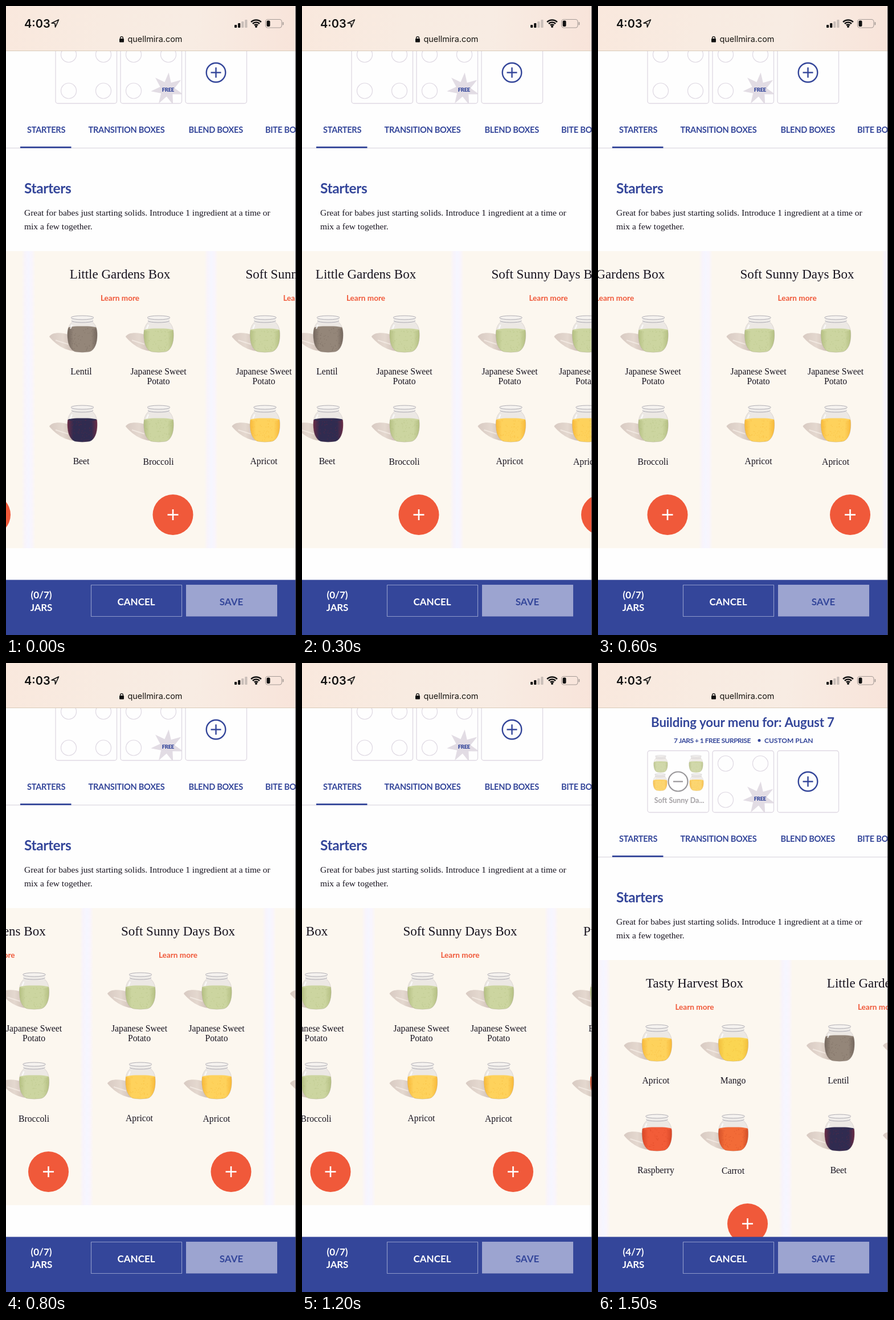
An HTML page with a canvas that plays this animation: 509x1101 px, repeating every 2700 ms.

```html
<!DOCTYPE html>
<html lang="en">
<head>
<meta charset="utf-8">
<title>Jar menu</title>
<style>
  html, body { margin: 0; width: 100%; height: 100%; overflow: hidden; background: #fff; }
  canvas { display: block; width: 100vw; height: 100vh; }
</style>
</head>
<body>
<canvas id="stage" width="509" height="1101"></canvas>
<script>
const W = 509, H = 1101, LOOP = 2700, STEP = 100;
const ctx = document.getElementById('stage').getContext('2d');
const BLUE = '#34469a', ORANGE = '#f0593a', INK = '#17131f', CREAM = '#fcf7ef', LINE = '#ded8e2';
const SANS = 'Lato, sans-serif', SERIF = '"Liberation Serif", serif', UI = 'Inter, sans-serif';

const FOODS = {
  Lentil: ['#948679', '#75685e'],
  'Japanese Sweet Potato': ['#ccd5a0', '#b5c083'],
  Broccoli: ['#ccd5a0', '#b5c083'],
  Beet: ['#302b50', '#6b2c45'],
  Apricot: ['#fed25c', '#f8b93a'],
  Mango: ['#fbd552', '#f2bf3c'],
  Raspberry: ['#f25c38', '#d94727'],
  Carrot: ['#f26b37', '#d34f28']
};
const SWEET = 'Japanese Sweet Potato';
const CARDS = [
  ['Tasty Harvest Box', 'Apricot', 'Mango', 'Raspberry', 'Carrot'],
  ['Little Gardens Box', 'Lentil', SWEET, 'Beet', 'Broccoli'],
  ['Soft Sunny Days Box', SWEET, SWEET, 'Apricot', 'Apricot'],
  ['Purple Meadow Treats', 'Broccoli', SWEET, 'Carrot', 'Mango']
];
const PITCH = 320.5, FIRST = 169.5, CARD_TOP = 520, CARD_H = 520;

// time, scroll, speed per step
const SCROLL = [
  [0, 290, 30], [300, 378, 28], [500, 432, 26.2],
  [800, 508.5, 11.3], [1000, 523, 6], [1200, 533, 4]
];

function scrollAt(t) {
  if (t >= 1500) return 0;
  if (t >= 1200) return 533;
  const i = SCROLL.findIndex(k => k[0] > t) - 1;
  const [t0, a, va] = SCROLL[i], [t1, b, vb] = SCROLL[i + 1];
  const n = (t1 - t0) / STEP, u = (t - t0) / (t1 - t0), v = 1 - u;
  return (1 + 2 * u) * v * v * a + u * v * v * n * va + u * u * (3 - 2 * u) * b - u * u * v * n * vb;
}

function random(seed) {
  return () => (seed = (seed * 16807) % 2147483647) / 2147483647;
}

function text(str, x, y, font, color, align = 'left', spacing = 0) {
  ctx.font = font;
  ctx.fillStyle = color;
  ctx.textAlign = align;
  ctx.letterSpacing = spacing + 'px';
  ctx.fillText(str, x, y);
}

function rect(x, y, w, h, color) {
  ctx.fillStyle = color;
  ctx.fillRect(x, y, w, h);
}

function stroke(color, width) {
  ctx.strokeStyle = color;
  ctx.lineWidth = width;
  ctx.stroke();
}

function fill(color) {
  ctx.fillStyle = color;
  ctx.fill();
}

function circle(x, y, r) {
  ctx.beginPath();
  ctx.arc(x, y, r, 0, Math.PI * 2);
}

function round(x, y, w, h, r) {
  ctx.beginPath();
  ctx.roundRect(x, y, w, h, r);
}

function ellipse(x, y, rx, ry) {
  ctx.beginPath();
  ctx.ellipse(x, y, rx, ry, 0, 0, Math.PI * 2);
}

function line(x1, y1, x2, y2, color, width) {
  ctx.beginPath();
  ctx.moveTo(x1, y1);
  ctx.lineTo(x2, y2);
  stroke(color, width);
}

function plus(x, y, arm, color, width) {
  line(x - arm, y, x + arm, y, color, width);
  line(x, y - arm, x, y + arm, color, width);
}

function jarBody() {
  ctx.beginPath();
  ctx.moveTo(-19, 13);
  ctx.bezierCurveTo(-25, 19, -27, 28, -26, 40);
  ctx.bezierCurveTo(-25, 54, -19, 64, -10, 64.5);
  ctx.quadraticCurveTo(0, 66, 10, 64.5);
  ctx.bezierCurveTo(19, 64, 25, 54, 26, 40);
  ctx.bezierCurveTo(27, 28, 25, 19, 19, 13);
  ctx.closePath();
}

function shadow() {
  ctx.beginPath();
  ctx.moveTo(-14, 63);
  ctx.bezierCurveTo(-32, 62, -48, 50, -58, 38);
  ctx.bezierCurveTo(-54, 29, -34, 30, -22, 35);
  ctx.lineTo(-10, 60);
  ctx.closePath();
  const g = ctx.createLinearGradient(-58, 0, -15, 0);
  g.addColorStop(0, '#d8cac2');
  g.addColorStop(0.55, '#e4d8cf');
  g.addColorStop(1, '#cfbfb5');
  fill(g);
  line(-47, 44, -25, 51, 'rgba(255,250,244,.5)', 2);
}

function jar(x, y, food, scale = 1, cast = true) {
  const [base, dark] = FOODS[food];
  const level = food === 'Lentil' ? 22 : 26;
  ctx.save();
  ctx.translate(x, y);
  ctx.scale(scale, scale);
  if (cast) shadow();

  jarBody();
  fill('#ece8e4');
  ctx.save();
  ctx.clip();
  const g = ctx.createLinearGradient(-26, 0, 26, 0);
  g.addColorStop(0, dark);
  g.addColorStop(0.2, base);
  g.addColorStop(0.8, base);
  g.addColorStop(1, dark);
  rect(-28, level, 56, 45, g);
  ellipse(0, level, 25, 2.6);
  fill(base);
  ctx.globalAlpha = 0.4;
  const rnd = random(food.length * 977 + 13);
  for (let i = 0; i < 70; i++) {
    rect(-26 + rnd() * 52, level + rnd() * 40, 1.4, 1.4, dark);
  }
  ctx.globalAlpha = 1;
  ctx.restore();
  jarBody();
  stroke('rgba(150,140,140,.3)', 0.8);

  round(-19, 4, 38, 10, 3);
  fill('#eeebe8');
  ellipse(0, 4.5, 20, 3.4);
  fill('#f5f2ef');
  stroke('#a9a6ad', 0.9);
  ctx.beginPath();
  ctx.ellipse(0, 10, 19, 3, 0, 0.1, Math.PI - 0.1);
  stroke('#aaa7af', 1);
  line(-18, 17, -21, 24, 'rgba(255,255,255,.8)', 2);
  ctx.restore();
}

function label(food, x, y) {
  const font = '15.7px ' + SERIF;
  const cut = food.lastIndexOf(' ');
  if (cut < 0) return text(food, x, y, font, INK, 'center');
  text(food.slice(0, cut), x, y, font, INK, 'center');
  text(food.slice(cut + 1), x, y + 17, font, INK, 'center');
}

function card([title, ...foods], c) {
  if (c < -180 || c > W + 180) return;
  rect(c - 150, CARD_TOP, 300.5, CARD_H, CREAM);
  text(title, c, 568, '23px ' + SERIF, INK, 'center');
  text('Learn more', c, 607, '700 13.6px ' + SANS, ORANGE, 'center');
  foods.forEach((food, i) => {
    const right = i % 2, row = i >> 1;
    jar(c + (right ? 68 : -66), 632 + row * 157, food);
    label(food, c + (right ? 67.5 : -68), 736 + row * 157 + right * row);
  });
  circle(c + 93, 981.5, 35.5);
  fill(ORANGE);
  plus(c + 93, 981.5, 9.5, '#fff', 2.6);
}

function gap(x) {
  const g = ctx.createLinearGradient(x - 2, 0, x + 22, 0);
  g.addColorStop(0, CREAM);
  g.addColorStop(0.25, '#f8f4fb');
  g.addColorStop(0.5, '#f6f6ff');
  g.addColorStop(0.75, '#f9f5fc');
  g.addColorStop(1, CREAM);
  rect(x - 2, CARD_TOP, 24, CARD_H, g);
}

function star(x, y) {
  ctx.beginPath();
  for (let i = 0; i < 14; i++) {
    const a = -1.48 + i * Math.PI / 7, r = i % 2 ? 13 : 29;
    ctx.lineTo(x + r * Math.cos(a), y + r * Math.sin(a));
  }
  ctx.closePath();
  fill('#e2dce4');
}

function emptySlots(x) {
  for (const dx of [23, 84]) {
    for (const y of [176, 239.5]) {
      circle(x + dx, y, 13.5);
      stroke(LINE, 1.2);
    }
  }
}

function chosenBox() {
  ctx.save();
  ctx.globalAlpha = 0.85;
  [[110, 161, SWEET], [172, 161, SWEET], [109, 193, 'Apricot'], [173, 193, 'Apricot']]
    .forEach(([x, y, food]) => jar(x, y, food, 0.47, false));
  ctx.restore();
  circle(140.5, 207.5, 17);
  fill('rgba(255,255,255,.85)');
  stroke('#99979a', 2.2);
  line(132, 207.5, 149, 207.5, '#99979a', 2.2);
  text('Soft Sunny Da...', 142.5, 245, '700 12.5px ' + SANS, '#a5a2a5', 'center');
}

function planBoxes(added) {
  if (added) chosenBox();
  else emptySlots(87);
  ctx.save();
  round(201, 153.5, 107.5, 108, 4);
  ctx.clip();
  emptySlots(201);
  circle(285, 239.5, 15);
  fill('#fff');
  star(283, 236.5);
  ctx.restore();
  for (const x of [87, 201, 315]) {
    round(x, 153.5, 107.5, 108, 4);
    stroke(LINE, 1.3);
  }
  text('FREE', 284.3, 240.5, '900 9.5px ' + SANS, BLUE, 'center', -0.4);
  circle(368.5, 207.5, 16.8);
  stroke(BLUE, 2.4);
  plus(368.5, 207.5, 9, BLUE, 2.4);
}

function page(scroll, added) {
  text('Building your menu for: August 7', 254, 112, '700 22.3px ' + SANS, BLUE, 'center', -0.15);
  text('7 JARS + 1 FREE SURPRISE', 133, 139.5, '700 12px ' + SANS, BLUE, 'left', -0.5);
  circle(283, 135.5, 2.5);
  fill(BLUE);
  text('CUSTOM PLAN', 292, 139.5, '700 12px ' + SANS, BLUE);
  planBoxes(added);

  [['STARTERS', 37], ['TRANSITION BOXES', 144.5], ['BLEND BOXES', 320.5], ['BITE BOXES', 455]]
    .forEach(([name, x]) => text(name, x, 313, '700 14.6px ' + SANS, BLUE, 'left', -0.3));
  rect(0, 339, W, 1.2, '#dcd8e0');
  rect(25, 337, 89.5, 2.8, BLUE);

  text('Starters', 32, 419, '700 24.5px ' + SANS, BLUE, 'left', -0.4);
  const body = '15.5px ' + SERIF;
  text('Great for babes just starting solids. Introduce 1 ingredient at a time or', 32, 458, body, INK);
  text('mix a few together.', 32, 482, body, INK);

  CARDS.forEach((item, i) => card(item, FIRST + PITCH * i - scroll));
  CARDS.forEach((item, i) => gap(FIRST + PITCH * i - scroll - 170.5));
}

function statusIcons() {
  ctx.beginPath();
  ctx.moveTo(92.5, 24);
  ctx.lineTo(86.5, 37);
  ctx.lineTo(86, 30.5);
  ctx.lineTo(80, 30);
  ctx.closePath();
  ctx.lineJoin = 'round';
  stroke('#111', 1.6);

  for (let i = 0; i < 4; i++) {
    const h = 5 + i * 3;
    round(401 + i * 6.1, 38 - h, 4.2, h, 1);
    fill(i < 2 ? '#111' : '#c9beb8');
  }

  for (const r of [4.5, 8.5, 12.5]) {
    ctx.beginPath();
    ctx.arc(439, 37, r, -Math.PI * 0.75, -Math.PI * 0.25);
    stroke('#111', 2.7);
  }
  circle(439, 36, 2);
  fill('#111');

  round(455.5, 23.5, 28.5, 14.5, 4);
  stroke('#a59b96', 1.1);
  round(457.5, 25.5, 6, 10.5, 2);
  fill('#111');
  round(485.5, 28, 1.8, 5.5, 1);
  fill('#a59b96');

  round(199, 57, 8, 6.5, 1);
  fill('#111');
  ctx.beginPath();
  ctx.arc(203, 56, 2.4, Math.PI, 0);
  ctx.lineTo(205.4, 58);
  ctx.moveTo(200.6, 56);
  ctx.lineTo(200.6, 58);
  stroke('#111', 1.3);
}

function header() {
  const g = ctx.createLinearGradient(0, 0, W, 50);
  g.addColorStop(0, '#f9e8dd');
  g.addColorStop(0.35, '#f8ebe1');
  g.addColorStop(0.65, '#f8ece3');
  g.addColorStop(1, '#f8e4da');
  rect(0, 0, W, 78, g);
  rect(0, 78, W, 1, '#d9cbb9');
  text('4:03', 32, 37.5, '600 20px ' + UI, '#111');
  text('quellmira.com', 213.5, 63, '14.4px ' + UI, '#16130f');
  statusIcons();
}

function bar(count) {
  rect(0, 1004.5, W, H - 1004.5, BLUE);
  const font = '700 17px ' + SANS;
  text(`(${count}/7)`, 62, 1037, font, '#fff', 'center');
  text('JARS', 62, 1059, font, '#fff', 'center', -0.2);
  ctx.strokeStyle = '#8d98c9';
  ctx.lineWidth = 1.2;
  ctx.strokeRect(149.5, 1013.5, 159, 55);
  text('CANCEL', 228.5, 1049, font, '#fff', 'center');
  rect(316, 1013, 160, 55.5, '#9ca4d0');
  text('SAVE', 395.5, 1049, font, BLUE, 'center');
}

function draw(time) {
  const t = Math.floor((time % LOOP) / STEP) * STEP;
  const added = t >= 1400;
  const lift = t < 1400 ? 91 : t < 1500 ? 46 : 0;
  rect(0, 0, W, H, '#fefefe');
  ctx.save();
  ctx.translate(0, -lift);
  page(scrollAt(t), added);
  ctx.restore();
  header();
  bar(added ? 4 : 0);
  rect(508, 0, 1, H, '#3c3a40');
}

const start = performance.now();
function tick() {
  draw(performance.now() - start);
  requestAnimationFrame(tick);
}
tick();
</script>
</body>
</html>
```
